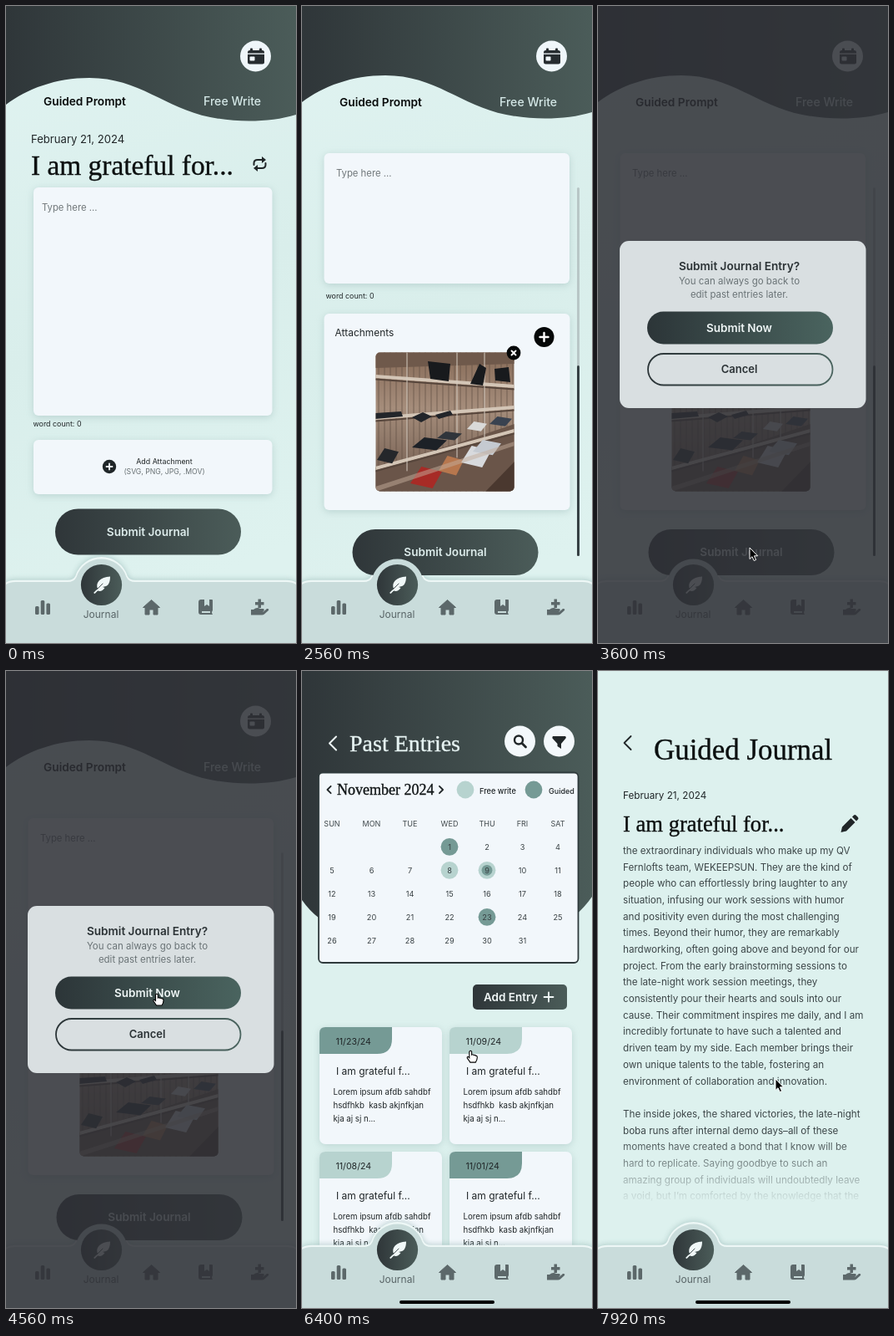
Animation, 348 px wide and 762 px high, one loop 8 s. Source, as an HTML page:

```html
<!DOCTYPE html>
<html lang="en">
<head>
<meta charset="utf-8">
<title>Journal app walkthrough</title>
<style>
html, body { margin: 0; width: 100%; height: 100%; overflow: hidden; background: #ddf1ee; }
svg { display: block; width: 100vw; height: 100vh; }
text { font-family: Inter, Roboto, sans-serif; white-space: pre; }
.serif { font-family: "Liberation Serif", "Noto Serif", serif; stroke: currentColor; stroke-width: .35; }
.card { fill: #f2f7fb; filter: drop-shadow(0 2px 4px #6f96944d); }
.line { fill: none; stroke-linecap: round; stroke-linejoin: round; }
</style>
</head>
<body>
<svg id="stage" viewBox="0 0 348 762" xmlns="http://www.w3.org/2000/svg"></svg>
<script>
const INK = '#202628', PAPER = '#f2f7fb', MINT = '#ddf1ee', LIGHT = '#b7d3cf', DEEP = '#759a95';
const stage = document.getElementById('stage');

const text = (x, y, size, str, { fill = INK, weight = 400, anchor = 'start', serif = false } = {}) =>
  `<text x="${x}" y="${y}" font-size="${size}" font-weight="${weight}" fill="${fill}" text-anchor="${anchor}"${
    serif ? ` class="serif" color="${fill}"` : ''}>${str}</text>`;
const rect = (x, y, w, h, r, fill, extra = '') =>
  `<rect x="${x}" y="${y}" width="${w}" height="${h}" rx="${r}" fill="${fill}" ${extra}/>`;
const card = (x, y, w, h, r = 6) => rect(x, y, w, h, r, PAPER, 'class="card"');
const circle = (x, y, r, fill) => `<circle cx="${x}" cy="${y}" r="${r}" fill="${fill}"/>`;
const path = (d, fill, extra = '') => `<path d="${d}" fill="${fill}" ${extra}/>`;
const line = (d, color, width) => `<path d="${d}" class="line" stroke="${color}" stroke-width="${width}"/>`;
const plus = (x, y, r, color, width) => line(`M${x - r} ${y}h${2 * r}M${x} ${y - r}v${2 * r}`, color, width);
const chevron = (x, y, w, color, width) =>
  line(`M${x + w / 2} ${y - Math.abs(w)}L${x - w / 2} ${y}L${x + w / 2} ${y + Math.abs(w)}`, color, width);

const backdrop = rect(0, 0, 348, 762, 0, 'url(#mint)');
const homeBar = rect(117, 753, 114, 4, 2, '#000');
const navRim = '<use href="#navRim"/>', navBar = '<use href="#navBar"/>', nav = navRim + navBar;
const navShape = 'M-4 770V699Q-3 688 12 688H74Q82 688 84.6 682A31.5 31.5 0 0 1 144.4 682Q147 688 155 688H336Q351 688 352 699V770Z';

const defs = `<defs>
  <linearGradient id="mint" x2=".2" y2="1"><stop stop-color="#e0f3f1"/><stop offset=".55" stop-color="#d9eeeb"/><stop offset="1" stop-color="#def2ef"/></linearGradient>
  <linearGradient id="dark"><stop stop-color="#2f3639"/><stop offset="1" stop-color="#4b5c59"/></linearGradient>
  <linearGradient id="green"><stop stop-color="#2c3538"/><stop offset="1" stop-color="#4a645f"/></linearGradient>
  <linearGradient id="fade" x2="0" y2="1"><stop stop-color="${MINT}" stop-opacity="0"/><stop offset="1" stop-color="${MINT}"/></linearGradient>
  <linearGradient id="wall" x2="0" y2="1"><stop stop-color="#876b58"/><stop offset=".4" stop-color="#a58d7b"/><stop offset="1" stop-color="#6d584c"/></linearGradient>
  <pattern id="slats" width="7" height="20" patternUnits="userSpaceOnUse"><path d="M0 0h2v20h-2z" fill="#5f4d41" opacity=".35"/></pattern>
  <clipPath id="photoClip">${rect(88.5, 414.5, 166, 166, 5, '#000')}</clipPath>
  <g id="navRim">${path(navShape, '#edf7f6', 'stroke="#edf7f6" stroke-width="2.6" style="filter:drop-shadow(0 -1px 3px #7fa5a377)"')}</g>
  <g id="navBar">
    ${path(navShape, '#c9dcdb', 'transform="translate(0 1)"')}
    ${circle(114.5, 692.5, 24.6, 'url(#dark)')}
    ${path('M105 702L110 697C107 690 113 683 125 682.5C125 689 123 693 120 694L116 695L118.5 696C116 700 113 700.5 110 699.5L106.5 703Z', '#f0f8f8')}
    ${line('M109 698L116 691', '#364144', .9)}
    ${text(114, 732, 12, 'Journal', { fill: '#596567', anchor: 'middle' })}
    <g fill="#5c686a">
      ${rect(35, 718, 4.6, 10, 1.5, '#5c686a')}${rect(41.7, 711, 4.6, 17, 1.5, '#5c686a')}${rect(48.4, 714.5, 4.6, 13.5, 1.5, '#5c686a')}
      <path d="M174.5 710.5L184.5 719.5H182V728H177V722H172V728H167V719.5H164.5Z" stroke="#5c686a" stroke-linejoin="round"/>
      <path d="M234 710H247Q248 710 248 711V723Q247 724 247 726L248 728H234Q231 728 231 725V713Q231 710 234 710Z"/>
      <path d="M235 724H245V726H235Z" fill="#c9dcdb"/><path d="M238 710H244V718L241 716L238 718Z" fill="#c9dcdb"/>
      <path d="M294 722H297Q301 718.5 305 721H309Q311 723 308 724.5H304H309L313 721Q316 720.5 315 723L310 727.5Q309 728.5 307 728.5H294Z"/>
      <path d="M302.5 709.5H306V713H309.5V716.5H306V720H302.5V716.5H299V713H302.5Z"/>
    </g>
  </g>
</defs>`;

function journalHeader(lift) {
  return `<g transform="translate(0 ${-lift})">${
    path('M0 -5H348V130C318 139 280 140 245 133C190 122 160 86 100 86C60 86 25 99 0 118Z', 'url(#dark)')}</g>` +
    text(45, 119 + lift / 3, 13.7, 'Guided Prompt', { fill: '#080b0b', weight: 600 }) +
    text(237, 119 + lift / 3, 14.1, 'Free Write', { fill: '#d5e8e7', weight: 500 }) +
    circle(299.5, 60, 18.5, '#eff6fa') +
    rect(290, 53, 20, 16.5, 2.5, '#262c30') + rect(293, 50.5, 3, 5, 1, '#262c30') + rect(304, 50.5, 3, 5, 1, '#262c30') +
    rect(290, 56.5, 20, 1.3, 0, '#eff6fa') + rect(292.5, 60.5, 6, 5, 1, '#eff6fa');
}

const submitButton = (x, y) =>
  rect(x, y, 223, 55, 27.5, 'url(#dark)') +
  text(x + 111.5, y + 32, 13.6, 'Submit Journal', { fill: '#dcebea', weight: 600, anchor: 'middle' });

const refresh = line('M297.5 190V188Q297.5 184 302 184H308M311.5 188V190Q311.5 194 307 194H301', INK, 2) +
  path('M307 180L312 184L307 188ZM302 190L297 194L302 198Z', INK);

const writeScene = backdrop + journalHeader(0) +
  text(30, 164, 13.1, 'February 21, 2024') +
  text(30, 202, 33.4, 'I am grateful for...', { fill: '#0c1010', serif: true }) + refresh +
  card(33, 217, 286.5, 273) + text(43, 244.5, 11.3, 'Type here ...', { fill: '#70777a' }) +
  text(32.5, 503, 8.9, 'word count: 0') +
  card(33, 519, 286.5, 65) + circle(124, 551, 8.2, INK) + plus(124, 551, 3.5, PAPER, 1.8) +
  text(190, 548, 8.85, 'Add Attachment', { anchor: 'middle' }) +
  text(190, 560, 8.7, '(SVG, PNG, JPG, .MOV)', { fill: '#687073', anchor: 'middle' }) +
  submitButton(59, 601.5) + nav;

function photo() {
  const shelf = (y0, y1) => line(`M88 ${y0}L255 ${y1}`, '#d3c5b6', 4) + line(`M88 ${y0 + 3.5}L255 ${y1 + 3.5}`, '#57463c', 2);
  const item = (x, y, w, h, fill) => path(`M${x} ${y}l${w * .35} ${-h}l${w * .65} ${h * .3}l${-w * .3} ${h}Z`, fill);
  return `<g clip-path="url(#photoClip)">` +
    rect(88, 414, 167, 167, 0, 'url(#wall)') + rect(88, 414, 167, 167, 0, 'url(#slats)') +
    path('M88 414H255V428L88 433Z', '#6f594b') +
    path('M88 552L190 522L255 500V581H88Z', '#6a5549') +
    shelf(443, 455) + shelf(493, 480) + shelf(553, 508) +
    line('M126 414V556M186 414V540M219 414V530', '#d5ccc1', 1) +
    path('M151 425L178 428L176 449L154 446ZM202 452L213 428L221 433L217 454ZM231 434L248 432L250 450L232 448Z', '#181a1d') +
    path('M88 487L119 485L121 491L88 494ZM132 492L145 486L156 491L143 498ZM160 489L178 484L181 489L164 494Z', '#22252a') +
    item(90, 543, 26, 14, '#25272b') + item(132, 528, 42, 12, '#1d2127') + item(162, 517, 30, 8, '#30353b') +
    item(198, 506, 24, 9, '#d9d9d8') + item(225, 500, 27, 9, '#394250') +
    item(130, 571, 38, 20, '#a72b26') + item(164, 556, 30, 18, '#b7774e') +
    item(191, 546, 36, 20, '#d8dadd') + item(205, 533, 34, 14, '#c5cad1') +
    path('M88 575L255 521V526L88 581Z', '#c3ae9b', 'opacity=".5"') +
    path('M220 581L255 545V581Z', '#4a382f') + '</g>';
}

// The button slides between the bar's bright rim and the bar itself.
const attachedScene = backdrop + journalHeader(3) +
  card(26.5, 176, 294.5, 156) + text(41, 203.5, 11.3, 'Type here ...', { fill: '#70777a' }) +
  text(28.5, 349.5, 8.9, 'word count: 0') +
  card(26.5, 368, 295, 235) + text(39.5, 394.5, 11.9, 'Attachments') +
  circle(290.5, 396, 12, '#050707') + plus(290.5, 396, 5, '#fff', 2.4) +
  photo() + circle(254, 415, 8.4, '#050707') + line('M251.5 412.5l5 5m0-5l-5 5', '#fff', 1.8) +
  rect(330, 217, 3, 441, 1.5, '#b8c6c6') + rect(330, 430, 3, 228, 1.5, '#364144') +
  navRim + submitButton(60.5, 626) + navBar;

const mid = (y, size, str, fill, weight) => text(169.5, y, size, str, { fill, weight, anchor: 'middle' });
const confirmDialog = rect(0, 0, 348, 762, 0, '#2e3036', 'opacity=".85"') +
  rect(26, 281, 295.5, 200, 11, '#d9dfe1') +
  mid(316, 13.6, 'Submit Journal Entry?', '#2b3235', 600) +
  mid(333, 11.5, 'You can always go back to', '#6b7477', 400) +
  mid(349, 11.5, 'edit past entries later.', '#6b7477', 400) +
  rect(59, 365.5, 223, 39, 19.5, 'url(#green)') + mid(389.5, 13.5, 'Submit Now', '#eef5f5', 600) +
  rect(60, 416, 221.5, 37.5, 18.75, 'none', 'stroke="url(#green)" stroke-width="1.8"') +
  mid(439, 13, 'Cancel', '#2b3235', 600);

function calendar() {
  const columns = [36, 83.5, 129.5, 177, 222, 264.5, 307];
  const marks = { 1: DEEP, 8: LIGHT, 9: LIGHT, 23: DEEP };
  let out = rect(20, 121.5, 311.5, 227.5, 5, PAPER, 'stroke="#2f3a3c" stroke-width="1.8"') +
    chevron(32.5, 142, 4.2, INK, 1.8) + chevron(167, 142, -4.2, INK, 1.8) +
    text(42, 148, 18, 'November 2024', { serif: true, fill: '#111617' }) +
    circle(196, 142, 10.4, LIGHT) + text(213, 146.5, 9.2, 'Free write', { weight: 500 }) +
    circle(278, 142, 10.4, DEEP) + text(296, 146.5, 9, 'Guided', { weight: 500 });
  ['SUN', 'MON', 'TUE', 'WED', 'THU', 'FRI', 'SAT'].forEach((day, i) =>
    out += text(columns[i], 186, 9, day, { anchor: 'middle', fill: '#424a4d' }));
  for (let day = 1; day <= 31; day++) {
    const slot = day + 2, x = columns[slot % 7], y = 210.3 + 28 * Math.floor(slot / 7);
    if (marks[day]) out += circle(x, y, 10.4, marks[day]);
    if (day === 9) out += circle(x, y, 6.4, DEEP);
    out += text(x, y + 3.4, 9.2, day, { anchor: 'middle', fill: '#394144' });
  }
  return out;
}

const entry = (x, y, date, color) => card(x, y, 147, 140, 7) +
  path(`M${x} ${y + 32}V${y + 7}q0-7 7-7h80v14q0 18-18 18Z`, color) +
  text(x + 19.5, y + 20.5, 10.6, date) +
  text(x + 20, y + 57, 12, 'I am grateful f...') +
  ['Lorem ipsum afdb sahdbf', 'hsdfhkb  kasb akjnfkjan', 'kja aj sj n...'].map((row, i) =>
    text(x + 16.5, y + 80.5 + 16.4 * i, 9.7, row)).join('');

const pastScene = rect(0, 0, 348, 762, 0, MINT) +
  path('M0 0H348V270Q330 296 300 310H48Q18 300 0 274Z', 'url(#dark)') +
  chevron(37, 86.5, 8, '#edf6f5', 2) +
  text(57, 96, 28, 'Past Entries', { serif: true, fill: '#e6f3f2' }) +
  circle(261.5, 84, 18.5, '#f3f8fb') +
  `<circle cx="260" cy="82.5" r="5" class="line" stroke="${INK}" stroke-width="2.4"/>` + line('M264 86.5l4.5 4.5', INK, 2.8) +
  circle(308.5, 84, 18.5, '#f3f8fb') + path('M301 78H316Q317.5 79 316.5 80.5L311 87V93L306.5 90V87L300.5 80.5Q300 79 301 78Z', INK) +
  calendar() +
  rect(205, 375, 113, 30, 5, 'url(#dark)') + text(218, 394.5, 13.5, 'Add Entry', { fill: '#f2f8f8', weight: 600 }) +
  plus(296, 390, 5.5, '#f2f8f8', 1.8) +
  entry(21, 426, '11/23/24', DEEP) + entry(177, 426, '11/09/24', LIGHT) +
  entry(21, 575, '11/08/24', LIGHT) + entry(177, 575, '11/01/24', DEEP) +
  nav + homeBar;

const story = `the extraordinary individuals who make up my QV
Fernlofts team, WEKEEPSUN. They are the kind of
people who can effortlessly bring laughter to any
situation, infusing our work sessions with humor
and positivity even during the most challenging
times. Beyond their humor, they are remarkably
hardworking, often going above and beyond for our
project. From the early brainstorming sessions to
the late-night work session meetings, they
consistently pour their hearts and souls into our
cause. Their commitment inspires me daily, and I am
incredibly fortunate to have such a talented and
driven team by my side. Each member brings their
own unique talents to the table, fostering an
environment of collaboration and innovation.

The inside jokes, the shared victories, the late-night
boba runs after internal demo days–all of these
moments have created a bond that I know will be
hard to replicate. Saying goodbye to such an
amazing group of individuals will undoubtedly leave
a void, but I’m comforted by the knowledge that the`.split('\n');

const readScene = rect(0, 0, 348, 762, 0, MINT) +
  chevron(35.5, 86, 8, INK, 1.8) +
  text(67, 106, 34.9, 'Guided Journal', { serif: true, fill: '#0c1010' }) +
  text(30, 152.5, 11.7, 'February 21, 2024') +
  text(30, 192, 26.6, 'I am grateful for...', { serif: true, fill: '#0c1010' }) +
  path('M291.5 193L293 186.5L303.5 176L308.5 181L298 191.5ZM305 174.5L307 172.5Q308.5 171.5 310 173L312 175Q313 176.5 312 177.5L310 179.5Z', INK) +
  story.map((row, i) => text(30, 219 + 19.68 * i, 11.65, row, { fill: '#3c4648' })).join('') +
  rect(0, 555, 348, 85, 0, 'url(#fade)') + nav + homeBar;

const pointers = `<g id="pointer">
  ${path('M0 0V13.5L3 10.7L5.2 15.5L7.6 14.5L5.4 9.8H9.5Z', '#000', 'id="arrow" stroke="#fff" stroke-width="1"')}
  ${path('M-1.5 1.2Q0-.8 1.3 1.2V5Q2.8 4 3.8 5.4Q5.3 4.8 6 6Q8 5.8 8 8Q8 11.5 6 14H-.5Q-2 11.5-4 9Q-4.5 7-2.5 7.5L-1.5 8.5Z', '#fff', 'id="hand" stroke="#000" stroke-width="1.1"')}
  </g>`;

const scenes = { writing: writeScene, attached: attachedScene, confirm: confirmDialog, past: pastScene, reading: readScene };
stage.innerHTML = defs + Object.entries(scenes).map(([id, body]) => `<g id="${id}">${body}</g>`).join('') + pointers;
const el = Object.fromEntries([...Object.keys(scenes), 'pointer', 'arrow', 'hand'].map(id => [id, document.getElementById(id)]));

const progress = (t, start, end) => Math.min(1, Math.max(0, (t - start) / (end - start)));
const smooth = p => p * p * (3 - 2 * p);
const show = (node, alpha) => {
  node.setAttribute('opacity', alpha);
  node.style.display = alpha > 0 ? '' : 'none';
};

function pointerAt(t) {
  const glide = (from, to, start, end) => {
    const p = smooth(progress(t, start, end));
    return from.map((v, i) => v + (to[i] - v) * p);
  };
  if (t < 2160) return t < 1200 ? null : { at: glide([-12, 575], [182.5, 548.5], 1200, 1680), hand: false };
  if (t < 3520) return null;
  if (t < 4680) {
    const at = glide([182, 648], [181, 386], 3720, 4400);
    return { at, hand: at[1] < 405 };
  }
  const at = glide([180.5, 385], [213, 488], 5600, 6900);
  return { at, hand: at[1] > 426 && t < 7600 };
}

function render(t) {
  show(el.attached, progress(t, 2120, 2420));
  show(el.confirm, progress(t, 3450, 3600));
  show(el.past, smooth(progress(t, 4600, 4900)));
  show(el.reading, smooth(progress(t, 7470, 7780)));
  const pointer = pointerAt(t);
  show(el.pointer, pointer ? 1 : 0);
  if (!pointer) return;
  el.pointer.setAttribute('transform', `translate(${pointer.at})`);
  show(el.arrow, pointer.hand ? 0 : 1);
  show(el.hand, pointer.hand ? 1 : 0);
}

const begin = performance.now();
function tick() {
  render((performance.now() - begin) % 8000);
  requestAnimationFrame(tick);
}
tick();
</script>
</body>
</html>
```
